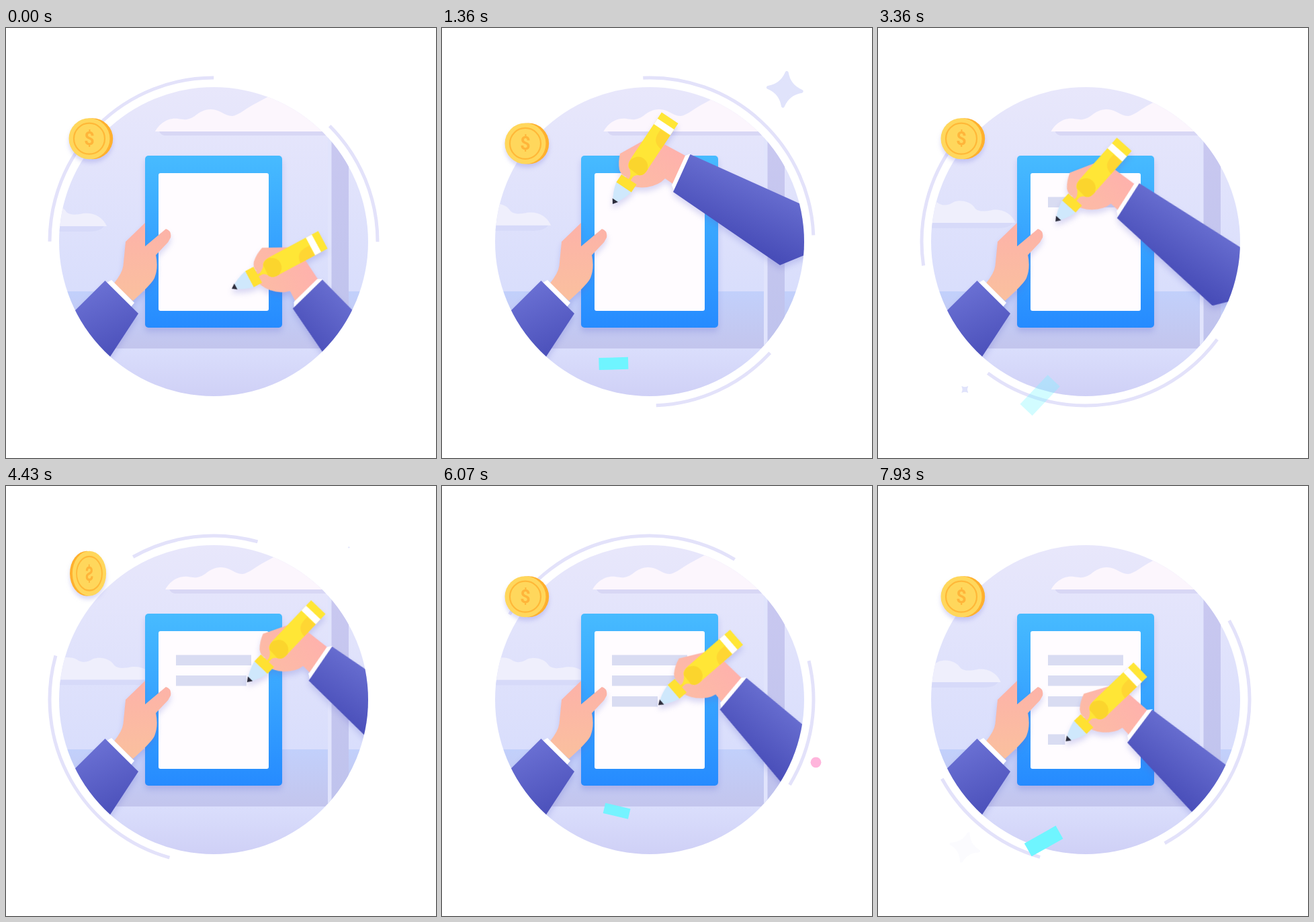
Write an HTML page that moves like this. It is 640x640 px and loops after 8 s.

```html
<!DOCTYPE html>
<html lang="en">
<head>
<meta charset="utf-8">
<title>Signing a form</title>
<style>
  html, body { margin: 0; width: 100%; height: 100%; overflow: hidden; background: #fff; }
  svg { display: block; width: 100vw; height: 100vh; }
  .soft { filter: drop-shadow(0 6px 4px rgba(96, 100, 205, .24)); }
  .coin { filter: drop-shadow(0 5px 3px rgba(110, 110, 220, .26)); }
  text { font: bold 27px Roboto, sans-serif; text-anchor: middle; }
</style>
</head>
<body>
<svg viewBox="0 0 640 640">
  <defs>
    <clipPath id="disc"><circle cx="309" cy="318" r="230"/></clipPath>
    <linearGradient id="wall" x2="0" y2="1">
      <stop stop-color="#e8e7fb"/><stop offset="1" stop-color="#d9defc"/>
    </linearGradient>
    <linearGradient id="sill" x2="0" y2="1">
      <stop stop-color="#c2d0fb"/><stop offset="1" stop-color="#c3c5ed"/>
    </linearGradient>
    <linearGradient id="floor" x2="0" y2="1">
      <stop stop-color="#dadefc"/><stop offset="1" stop-color="#cfd0f6"/>
    </linearGradient>
    <linearGradient id="post" x2="0" y2="1">
      <stop stop-color="#c9c8f0"/><stop offset="1" stop-color="#bfc3ed"/>
    </linearGradient>
    <linearGradient id="tablet" x2="0" y2="1">
      <stop stop-color="#47bbff"/><stop offset="1" stop-color="#268bff"/>
    </linearGradient>
    <linearGradient id="skinL" x2="0" y2="1">
      <stop stop-color="#fdb2a9"/><stop offset="1" stop-color="#fac09e"/>
    </linearGradient>
    <linearGradient id="skinR" x1="0" y1="1" x2="1" y2="0">
      <stop stop-color="#fcbda4"/><stop offset="1" stop-color="#ffafae"/>
    </linearGradient>
    <linearGradient id="cloth" x1=".2" y1="0" x2=".6" y2="1">
      <stop stop-color="#7076d8"/><stop offset="1" stop-color="#464bb6"/>
    </linearGradient>
    <linearGradient id="clothR" gradientUnits="userSpaceOnUse" x1="440" y1="210" x2="400" y2="300">
      <stop stop-color="#696fd1"/><stop offset="1" stop-color="#484db8"/>
    </linearGradient>
    <path id="star" d="M0-25Q5.5-5.5 25 0Q5.5 5.5 0 25Q-5.5 5.5-25 0Q-5.5-5.5 0-25Z"
      fill="#e0e3fb" stroke="#e0e3fb" stroke-width="5" stroke-linejoin="round"/>
  </defs>

  <g id="ring" fill="none" stroke="#e3e2fa" stroke-width="5">
    <path d="M65 318A244 244 0 0 1 309 74"/>
    <path d="M481.5 145.5A244 244 0 0 1 553 318"/>
  </g>

  <g clip-path="url(#disc)">
    <rect x="79" y="88" width="460" height="304" fill="url(#wall)"/>
    <rect x="79" y="392" width="460" height="85" fill="url(#sill)"/>
    <rect x="479" y="150" width="6" height="327" fill="#e1e4fc"/>
    <rect x="484.500" y="150" width="25.500" height="327" fill="url(#post)"/>
    <rect x="79" y="477" width="460" height="72" fill="url(#floor)"/>

    <g id="cloudTop">
      <path d="M228 154H520V160H236Q230 159 228 154Z" fill="#d8d7f5"/>
      <path d="M222 154C227 145 238 133 256 135C266 137 272 137 281 131C291 123 300 119 312 122C323 125 327 131 337 131C346 130 358 119 372 112L450 70H520V154Z" fill="#fcf6fd"/>
    </g>
    <g id="cloudLeft">
      <path d="M-60 295H146Q140 304 120 303H-60Z" fill="#d5d8f8" opacity=".75"/>
      <path d="M150 295C144 281 130 274 115 276C104 278 96 279 90 274C84 264 70 260 58 264C50 269 42 271 34 265C20 257 0 266-60 268V295Z" fill="#efeffc"/>
    </g>

    <rect class="soft" x="207" y="190" width="204" height="256" rx="5" fill="url(#tablet)"/>
    <rect x="227" y="216" width="164" height="205" rx="3" fill="#fffcff"/>
    <g id="lines" fill="#d9dcf2"></g>

    <g class="soft">
      <path d="M160 381Q173 365 174.500 354L178 318L207 290V325L238 299Q247 302 245 312L241 319L223 338Q227 357 221 372Q217 381 189 406Z" fill="url(#skinL)"/>
      <path d="M150 379L157 375L191 409L186 415Z" fill="#fff"/>
      <path d="M147.500 376L197 425L140 512L80 443Z" fill="url(#cloth)"/>
    </g>

    <g class="soft">
      <g id="hand">
        <path d="M366 192L327 171Q312 162 299 168L265 187Q262 199 264 211Q267 220 274 221Q268 228 274 232Q288 239 305 237Q323 234 332 224L348 235Z" fill="url(#skinR)"/>
        <g transform="translate(254 262) rotate(-56.4)">
          <path d="M0 0Q15-10 30-13.500V13.500Q15 10 0 0Z" fill="#cfe8fc"/>
          <path d="M0 0L7-5V5Z" fill="#2d2d3c"/>
          <path d="M30-13.500H44V13.500H30Z" fill="#ffe132"/>
          <path d="M43 1H52" stroke="#ffe132" stroke-width="3.500"/>
          <path id="barrel" d="M48-1Q55-3 59-11Q63-15 72-14.800H154V14.800H72Q60 16 57 8Q54 3 48 2Z" fill="#ffe636"/>
          <path d="M58-9Q63-15 70-14Q82-10 82 0Q82 10 72 14.800Q60 16 57 8Z" fill="#fbd52d"/>
          <path d="M108 14.800Q109-2 126-2H132V14.800Z" fill="#ffd633"/>
          <path d="M133-14.800H143V14.800H133Z" fill="#fff"/>
        </g>
        <g id="sleeve">
          <path d="M362 190L370 187L346 244L342 234Z" fill="#fff"/>
          <path d="M369.500 188L625 303L503 353L344 244Z" fill="url(#clothR)"/>
        </g>
      </g>
    </g>
  </g>

  <use href="#star" id="starA"/>
  <use href="#star" id="starB"/>
  <circle id="dot" cx="556.500" cy="411.300" fill="#ffb5dc"/>
  <rect id="chip" x="-.5" y="-.5" width="1" height="1" fill="#6ff5ff"/>

  <g class="coin">
    <g id="coin">
      <ellipse id="edge" cy="0" rx="30.500" ry="30.500" fill="#ffb02e"/>
      <g id="face">
        <circle r="30.500" fill="#ffd75c"/>
        <circle r="23" fill="none" stroke="#ffb838" stroke-width="2.200"/>
        <text y="9.500" fill="#ffb53a">$</text>
      </g>
    </g>
  </g>
</svg>

<script>
const LOOP = 8000;
const $ = id => document.getElementById(id);
const set = (el, attrs) => { for (const k in attrs) el.setAttribute(k, attrs[k]); };
const clamp = u => Math.max(0, Math.min(1, u));
const span = (t, a, b) => clamp((t - a) / (b - a));
const sine = u => (1 - Math.cos(Math.PI * u)) / 2;
const smooth = u => u * u * (3 - 2 * u);
const mix = (a, b, u) => a + (b - a) * u;
const wave = (t, period) => (1 - Math.cos(2 * Math.PI * t / period)) / 2;

// Pen tip: time, x, y, turn
const PEN = [
  [0, 336, 388, 28.2],
  [1350, 254, 262, 0],
  [1400, 254, 262, 0],
  [2580, 366, 261, 0],
  [3560, 253, 291, 9],
  [4600, 366, 292, 10],
  [5500, 253, 326, 15.5],
  [6500, 366, 326, 15.5],
  [7550, 253, 379, 11.5],
  [8550, 336, 382, 15]
];

// Written lines: top, start, end
const LINES = [
  [251.5, 1400, 2580],
  [282, 3560, 4600],
  [313, 5500, 6500],
  [369.5, 7550, 8550]
].map(([y, from, to]) => {
  const el = document.createElementNS("http://www.w3.org/2000/svg", "rect");
  set(el, { x: 253, y, height: 15.5, width: 0 });
  $("lines").append(el);
  return { el, from, to };
});

function penAt(t) {
  let i = 0;
  while (i < PEN.length - 2 && t >= PEN[i + 1][0]) i++;
  const a = PEN[i], b = PEN[i + 1], u = sine(span(t, a[0], b[0]));
  return [1, 2, 3].map(k => mix(a[k], b[k], u));
}

function drawHand(t) {
  const [x, y, turn] = penAt(t);
  set($("hand"), { transform: `translate(${x} ${y}) rotate(${turn}) translate(-254 -262)` });
  set($("sleeve"), { transform: `rotate(${-7 * (1 - sine(span(t, 0, 1350)))} 355 212)` });
  for (const { el, from, to } of LINES) {
    const end = t < from ? 253 : penAt(Math.min(t, to))[0];
    set(el, { width: Math.max(0, end - 254) });
  }
}

function drawCoin(t) {
  const p = t % 2800;
  let y = 0;
  if (p < 1400) y = 8 * sine(span(p, 1200, 1400));
  else if (p < 1800) y = mix(8, -46, Math.sin(span(p, 1400, 1800) * Math.PI / 2));
  else y = -46 * Math.cos(span(p, 1800, 2150) * Math.PI / 2);
  const spin = Math.cos(4 * Math.PI * smooth(span(p, 1400, 2200)));
  const tall = 1 + .1 * Math.sin(Math.PI * span(p, 1420, 1900));
  set($("coin"), { transform: `translate(124 ${164.7 + y}) scale(1 ${tall})` });
  set($("edge"), { cx: 4.7 * spin, rx: Math.max(2, 30.5 * Math.abs(spin)) });
  set($("face"), { transform: `scale(${spin} 1)` });
}

function drawStar(el, x, y, scale, turn, opacity) {
  set(el, { transform: `translate(${x} ${y}) rotate(${turn}) scale(${scale})`, opacity });
}

function drawConfetti(t) {
  const a = t - (t < 4000 ? 430 : 4380);
  drawStar($("starA"), 510.3, 91.3, span(a, 0, 900), a * .1038, 1 - span(a, 1020, 1330));

  const b = t - (t < 5000 ? 3250 : 7250);
  drawStar($("starB"), 129.3, 538, .85 * Math.sin(span(b, 0, 600) * Math.PI / 2),
    45 + (b - 110) * .104, 1 - span(b, 400, 720));

  const c = t - (t < 4500 ? 1340 : 5490);
  set($("dot"), { r: 18 * sine(span(c, 0, 1260)), opacity: 1 - span(c, 1450, 1900) });

  const p = t % 5570, u = smooth(span(p, 300, 3500));
  set($("chip"), {
    transform: `translate(${mix(260.3, 241, u)} ${mix(483, 547, u)}) rotate(${mix(14, -47, u)})
      scale(${mix(38, 60, u)} ${mix(15.5, 25, u)})`,
    opacity: Math.min(span(p, 100, 530), 1 - span(p, 2900, 3570))
  });
}

function draw(t) {
  set($("ring"), { transform: `rotate(${t * .06445} 309 318)` });
  set($("cloudTop"), { transform: `translate(${39 * wave(t, 5640)} 0)` });
  const drift = wave(t, 10300);
  set($("cloudLeft"), { transform: `translate(${75 * drift} ${-7 * drift})` });
  drawHand(t);
  drawCoin(t);
  drawConfetti(t);
}

const start = performance.now();
(function tick() {
  draw((performance.now() - start) % LOOP);
  requestAnimationFrame(tick);
})();
</script>
</body>
</html>
```
